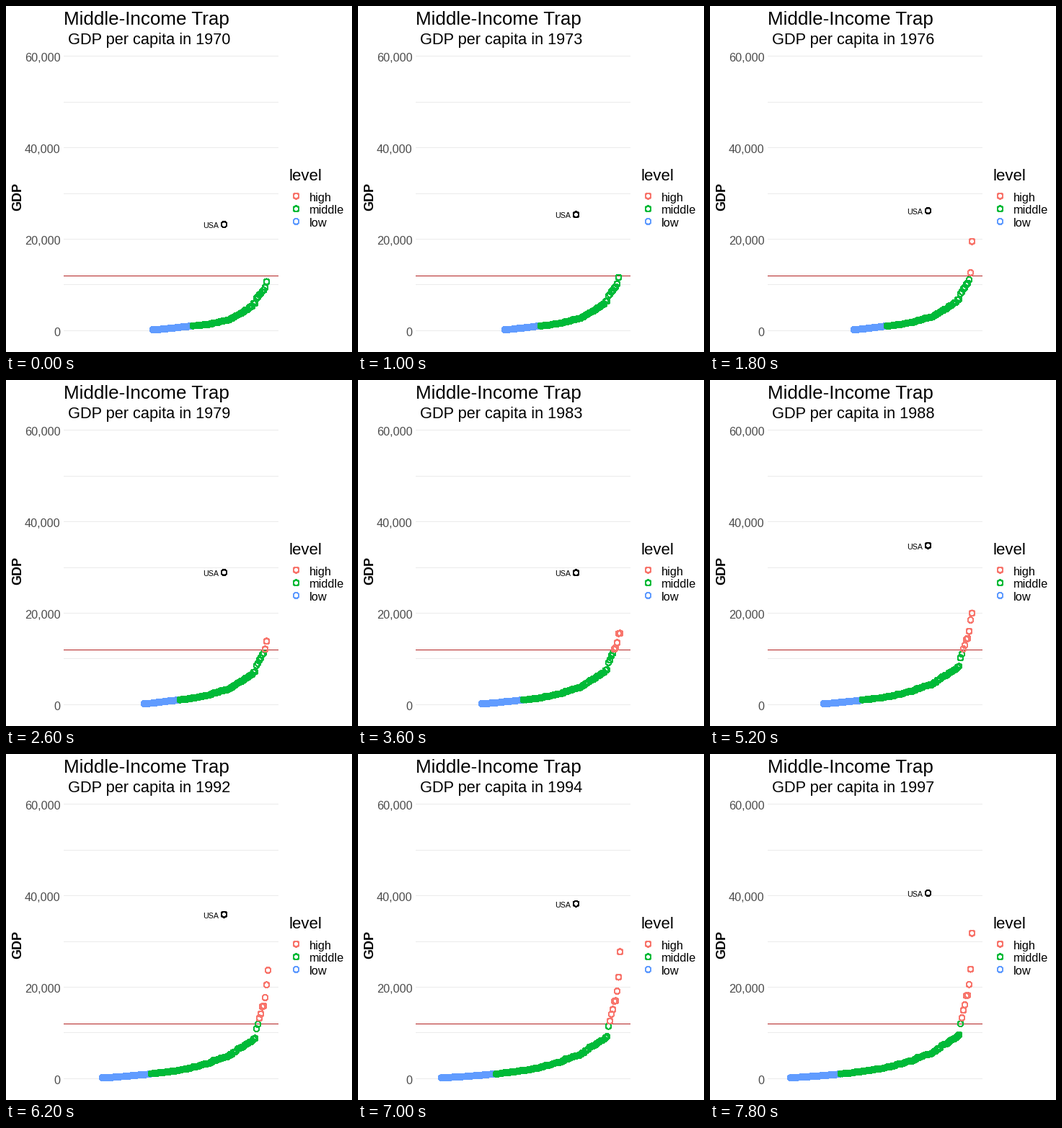
A matplotlib script for the animation above (8000 ms loop, 480 by 480 pixels).

```python
import matplotlib.pyplot as plt
import numpy as np
from matplotlib.animation import FuncAnimation

SIZE, DPI = 480, 100
FRAMES, STEP_MS = 40, 200
YEARS_PER_FRAME = 48 / 69
PT = 72 / DPI
RED, GREEN, BLUE = "#F8766D", "#00BA38", "#619CFF"
LOW, HIGH = 1, 12                # level limits, in thousands
BEND, PEER, LEAD = 345, 361, 363  # x where the tail starts, second and first rank

# Key points as (frames, values).
START = [0, 6, 13, 18, 26, 36], [203, 203, 192, 172, 157, 111]
LEADER = [6, 9, 13, 18, 26, 31, 39], [10, 19.5, 13, 15.6, 20, 23.7, 31.8]
USA = [0, 4, 7, 13, 17, 26, 29, 31, 39], [23.2, 25.6, 24.9, 28.9, 28.1,
                                          34.8, 35.8, 35.9, 40.6]

plt.rcParams["font.family"] = "Liberation Sans"
SLOTS = np.arange(111, LEAD, 2)
NOISE = np.random.default_rng(7).normal(0, 0.05, len(SLOTS))


def y_of(thousands):
    return 450.25 - thousands * 6.34


def incomes(i):
    """Ranked incomes: a near-linear foot, an exponential body, a steep tail."""
    s = i / (FRAMES - 1)
    start = np.interp(i, *START)
    border = 257 - 1.3 * i - 0.018 * i ** 2
    knee = 6.2 + 3.5 * s
    peer = 10.5 + 13 * s ** 1.3

    foot = np.clip((SLOTS - start) / (border - start), 0, 1)
    body = np.clip((SLOTS - border) / (BEND - border), 0, 1)
    tail = np.clip((SLOTS - BEND) / (PEER - BEND), 0, 1)
    bow = 1 + 0.3 * (1 - s) ** 3
    v = np.where(SLOTS < border, 0.17 + 0.83 * foot ** 1.2,
                 knee ** (body ** bow))
    v = np.sort((v + tail * (peer - knee)) * np.exp(NOISE))

    shown = SLOTS >= start - 1
    x, v = SLOTS[shown], v[shown]
    leader = np.interp(i, *LEADER)
    if leader > peer:
        x, v = np.append(x, LEAD), np.append(v, leader)
    return x + 0.5, v


def level_color(v):
    return RED if v > HIGH else GREEN if v > LOW else BLUE


fig = plt.figure(figsize=(SIZE / DPI, SIZE / DPI), dpi=DPI, facecolor="white")
ax = fig.add_axes([0, 0, 1, 1])
ax.set_xlim(0, SIZE)
ax.set_ylim(SIZE, 0)
ax.axis("off")


def label(x, y, text, px, **kw):
    return ax.text(x, y, text, fontsize=px * PT, va="baseline", **kw)


def rings(x, y, colors, z=3):
    return ax.scatter(x, y, s=(7.8 * PT) ** 2, facecolors="none",
                      edgecolors=colors, linewidths=1.15 * PT,
                      antialiased=False, zorder=z)


def rule(v, color, z):
    ax.plot([80, 376.9], [y_of(v) - 0.5] * 2, color=color, lw=PT,
            solid_capstyle="projecting", zorder=z)


for v in range(0, 70, 10):
    rule(v, "#EBEBEB", 1)
    if v % 20 == 0:
        label(75.5, y_of(v) + 7.3, f"{v * 1000:,}", 16.3, ha="right",
              color="#4D4D4D")
rule(HIGH, "#B22222", 2)

label(79.5, 26, "Middle-Income Trap", 26)
subtitle = label(80, 53, "", 21.8)
label(20.8, 264, "GDP", 18, weight="bold", rotation=90,
      rotation_mode="anchor", ha="center")
label(392, 242.5, "level", 22.3)
for row, (name, color) in enumerate([("high", RED), ("middle", GREEN),
                                     ("low", BLUE)]):
    y = 263.7 + 17.6 * row
    rings([402.5], [y], [color])
    label(421, y + 6.8, name, 16.4)

dots = rings([], [], [])
usa_dot = rings([302.5], [0], ["black"], 4)
usa_label = label(295.3, 0, "USA", 10.6, ha="right")


def draw(i):
    year = 1970 + int(i * YEARS_PER_FRAME + 0.5)
    subtitle.set_text(f" GDP per capita in {year}")
    x, v = incomes(i)
    dots.set_offsets(np.column_stack([x, y_of(v)]))
    dots.set_edgecolors([level_color(value) for value in v])
    y = y_of(np.interp(i, *USA))
    usa_dot.set_offsets([[302.5, y]])
    usa_label.set_y(y + 5)
    return subtitle, dots, usa_dot, usa_label


anim = FuncAnimation(fig, draw, frames=FRAMES, interval=STEP_MS,
                     repeat=True, repeat_delay=0)
plt.show()
```
